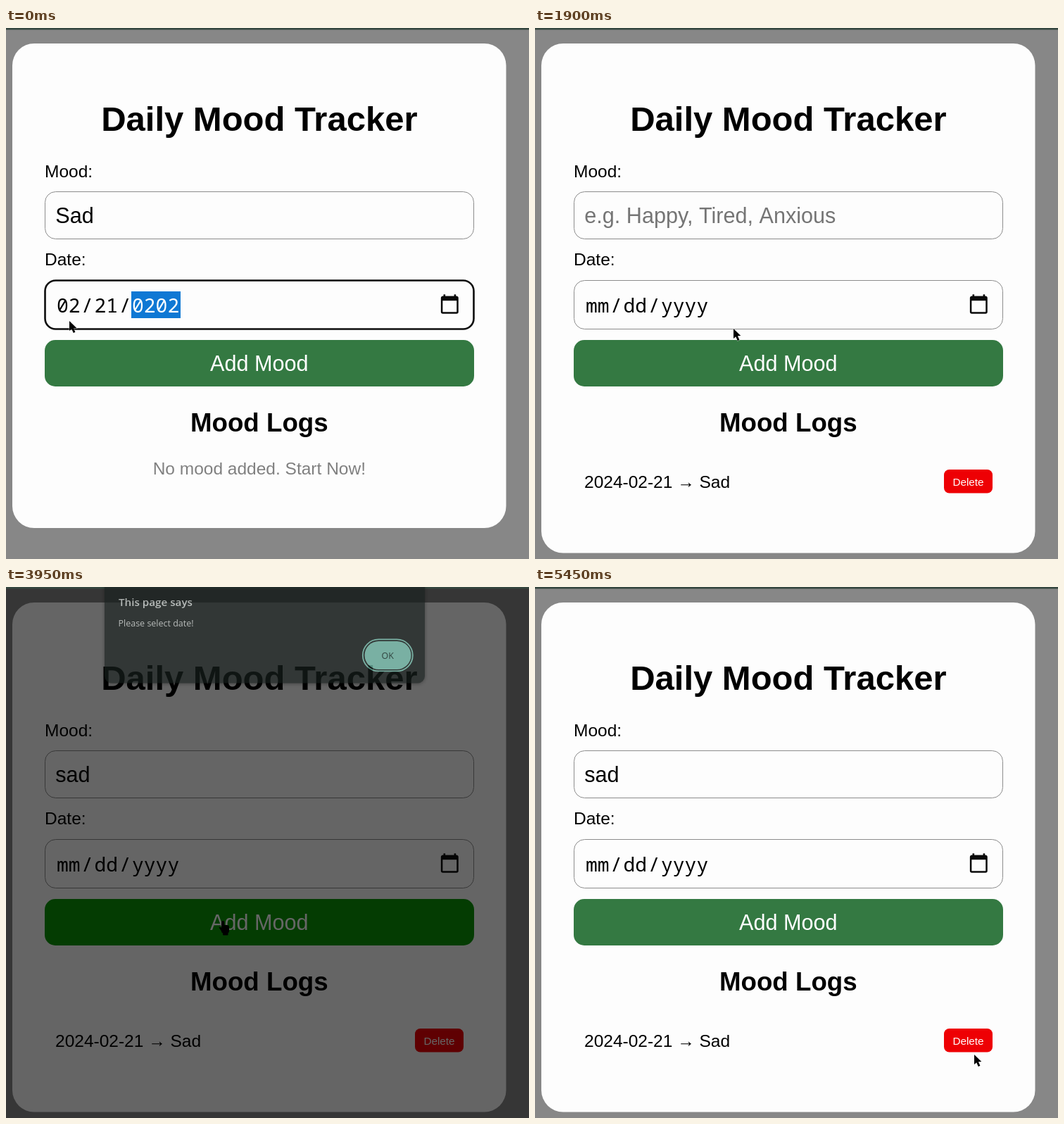
These frames come from a looping animation (743 px wide and 754 px high, 5500 ms). An HTML page with a canvas:

```html
<!DOCTYPE html>
<html lang="en">
<head>
<meta charset="utf-8">
<title>Daily Mood Tracker</title>
<style>
html, body { margin: 0; width: 100%; height: 100%; overflow: hidden; background: #878787; }
canvas { display: block; }
</style>
</head>
<body>
<canvas id="stage" width="743" height="754"></canvas>
<script>
const W = 743, H = 754, LOOP = 5500;
const SANS = '"Liberation Sans", Arial, sans-serif';
const MONO = '"Noto Sans Mono", monospace';
const UI = '"Open Sans", "Noto Sans", sans-serif';
const MID = 359.8;

const stage = document.getElementById('stage').getContext('2d');
const layer = document.createElement('canvas');
layer.width = W;
layer.height = H;
const sheet = layer.getContext('2d');
let ctx = stage;

const clamp = v => Math.max(0, Math.min(1, v));
const inside = (p, x, y, w, h) => p.x >= x && p.x <= x + w && p.y >= y && p.y <= y + h;

function text(str, x, y, font, color, align = 'left') {
  ctx.font = font;
  ctx.fillStyle = color;
  ctx.textAlign = align;
  ctx.fillText(str, x, y);
}

function box(x, y, w, h, r, fill, stroke, line) {
  ctx.beginPath();
  ctx.roundRect(x, y, w, h, r);
  if (fill) { ctx.fillStyle = fill; ctx.fill(); }
  if (stroke) { ctx.strokeStyle = stroke; ctx.lineWidth = line; ctx.stroke(); }
}

function poly(points, fill, stroke) {
  ctx.beginPath();
  points.forEach(([x, y]) => ctx.lineTo(x, y));
  ctx.closePath();
  if (stroke) { ctx.strokeStyle = stroke; ctx.lineWidth = 1.5; ctx.stroke(); }
  ctx.fillStyle = fill;
  ctx.fill();
}

// Pointer path: time, x, y
const path = [
  [0, 90, 416], [600, 90, 416], [1200, 146, 462], [1450, 146, 462],
  [1900, 282, 427], [2400, 328, 272], [2700, 323, 296], [3300, 323, 296],
  [3750, 308, 474], [4150, 308, 474], [4900, 542, 123], [5030, 542, 123],
  [5450, 624, 664], [LOOP, 624, 664]
];

function pointerAt(t) {
  const i = Math.max(1, path.findIndex(k => k[0] > t));
  const [t0, x0, y0] = path[i - 1], [t1, x1, y1] = path[i];
  const u = clamp((t - t0) / (t1 - t0)), e = u * u * (3 - 2 * u);
  return { x: x0 + (x1 - x0) * e, y: y0 + (y1 - y0) * e };
}

function stateAt(t) {
  const p = pointerAt(t);
  const modal = t >= 3900 && t < 5050;
  const logged = t >= 1400;
  const typed = 'sad'.slice(0, [2850, 2950, 3050].filter(k => t >= k).length);
  const overButton = inside(p, 55, 443, 610, 66);
  const overDelete = logged && inside(p, 581, 627, 69, 33);
  let shape = 'arrow';
  if (modal) shape = t < 4150 ? 'hand' : 'arrow';
  else if (overButton || overDelete) shape = 'hand';
  else if (inside(p, 55, 232, 610, 68)) shape = 'beam';
  return {
    p, shape, logged,
    mood: logged ? typed : 'Sad',
    year: t < 150 ? '0202' : '2024',
    dateFocus: t < 1250,
    moodFocus: t >= 2450 && t < 3850,
    caret: t < 3050 || (t - 3050) % 1000 < 500,
    hover: overButton || modal,
    dim: Math.min(clamp((t - 3850) / 100), clamp((5050 - t) / 100)),
    dialog: Math.min(clamp((t - 3885) / 100), clamp((5095 - t) / 100))
  };
}

function field(y, h, focus) {
  if (focus) box(55.5, y + 0.5, 609, h - 1, 15, null, '#0d0d0d', 2.6);
  else box(55.5, y + 0.5, 609, h - 1, 15, null, '#8c8c8c', 1);
}

function calendar() {
  ctx.fillStyle = '#0a0a0a';
  ctx.fillRect(621.5, 378.3, 2.6, 4);
  ctx.fillRect(636.6, 378.3, 2.6, 4);
  ctx.fillRect(619.5, 380.8, 21.6, 6.4);
  box(619.1, 382.1, 22.4, 22.3, 1.5, null, '#0a0a0a', 2.5);
}

function dateField(s) {
  field(358, 70, s.dateFocus);
  const font = '28px ' + MONO, y = 403.5;
  if (s.dateFocus) {
    ctx.fillStyle = '#0f78d4';
    ctx.fillRect(178, 374, 70, 38);
  }
  const parts = s.logged ? ['mm', 'dd', 'yyyy'] : ['02', '21', s.year];
  text(parts[0], 72, y, font, '#000');
  text('/', 107, y, font, '#000');
  text(parts[1], 125.5, y, font, '#000');
  text('/', 160.7, y, font, '#000');
  text(parts[2], 179, y, font, s.dateFocus ? '#fff' : '#000');
  calendar();
}

function moodField(s) {
  field(232, 68, s.moodFocus);
  const font = '30.6px ' + SANS;
  if (s.mood) text(s.mood, 70.3, 276.5, font, '#000');
  else text('e.g. Happy, Tired, Anxious', 70.3, 276.5, font, '#757575');
  if (s.moodFocus && s.caret) {
    ctx.font = font;
    const x = 70.5 + ctx.measureText(s.mood).width;
    ctx.fillStyle = '#000';
    ctx.fillRect(x, 249, 1.6, 34);
  }
}

function page(s) {
  ctx.fillStyle = '#878787';
  ctx.fillRect(0, 0, W, H);
  box(9, 22, 701.5, s.logged ? 723.5 : 688, 31, '#fdfdfd');
  text('Daily Mood Tracker', MID, 146, 'bold 49px ' + SANS, '#000', 'center');
  const label = '24.5px ' + SANS;
  text('Mood:', 55, 212, label, '#000');
  moodField(s);
  text('Date:', 55, 337, label, '#000');
  dateField(s);
  box(55, 443, 610, 66, 15, s.hover ? '#0a9605' : '#347942');
  text('Add Mood', MID, 486.5, '30.6px ' + SANS, '#fff', 'center');
  text('Mood Logs', MID, 573, 'bold 36.7px ' + SANS, '#000', 'center');
  if (s.logged) {
    text('2024-02-21 → Sad', 70, 652.5, label, '#000');
    box(581, 627, 69, 33.5, 7.5, '#ee0004');
    text('Delete', 615.5, 649.5, '15.3px ' + SANS, '#fff', 'center');
  } else {
    text('No mood added. Start Now!', MID, 634, label, '#808080', 'center');
  }
}

function dialog(show) {
  ctx = sheet;
  ctx.clearRect(0, 0, W, H);
  ctx.save();
  ctx.translate(0, -31 * (1 - show));
  ctx.shadowColor = 'rgba(0,0,0,0.5)';
  ctx.shadowBlur = 5;
  ctx.shadowOffsetY = 1;
  box(140, -40, 455, 187, 10, '#18201e');
  ctx.shadowColor = 'transparent';
  text('This page says', 160, 37.5, '600 15.2px ' + UI, '#e6ecea');
  text('Please select date!', 159.5, 66.5, '12.5px ' + UI, '#e2e7e5');
  box(506.8, 85, 71, 45, 22.5, null, '#85d9c5', 1.8);
  box(509.5, 87.5, 66, 40, 20, '#84d8c4');
  text('OK', 542.2, 112.3, '500 12.4px ' + UI, '#17352e', 'center');
  ctx.restore();
  ctx = stage;
  ctx.globalAlpha = show;
  ctx.drawImage(layer, 0, 0);
  ctx.globalAlpha = 1;
}

const cursors = {
  arrow() {
    poly([[0, 0], [0, 14], [3.2, 11.2], [5.8, 17], [8.4, 15.8], [5.9, 10.2], [10.3, 10]],
      '#000', 'rgba(255,255,255,0.35)');
  },
  hand() {
    box(-2, 0, 4.2, 13, 2, '#000');
    box(-2, 6, 11, 11.5, 3, '#000');
    poly([[-5.5, 9.5], [-3.6, 8.8], [-1, 11], [4, 16], [0, 17.5]], '#000');
    box(0, 15, 7.5, 5.5, 1, '#000');
  },
  beam() {
    ctx.fillStyle = '#000';
    ctx.fillRect(-1, -7, 2, 14);
    ctx.fillRect(-4, -7.5, 8, 2);
    ctx.fillRect(-4, 5.5, 8, 2);
  }
};

function draw(t) {
  const s = stateAt(t);
  page(s);
  if (s.dim > 0) {
    ctx.fillStyle = `rgba(0,0,0,${0.6 * s.dim})`;
    ctx.fillRect(0, 0, W, H);
  }
  ctx.fillStyle = '#34463f';
  ctx.fillRect(0, 0, W, 2.5);
  if (s.dialog > 0) dialog(s.dialog);
  ctx.save();
  ctx.translate(s.p.x, s.p.y);
  cursors[s.shape]();
  ctx.restore();
}

const start = performance.now();
function tick() {
  draw((performance.now() - start) % LOOP);
  requestAnimationFrame(tick);
}
tick();
</script>
</body>
</html>
```
